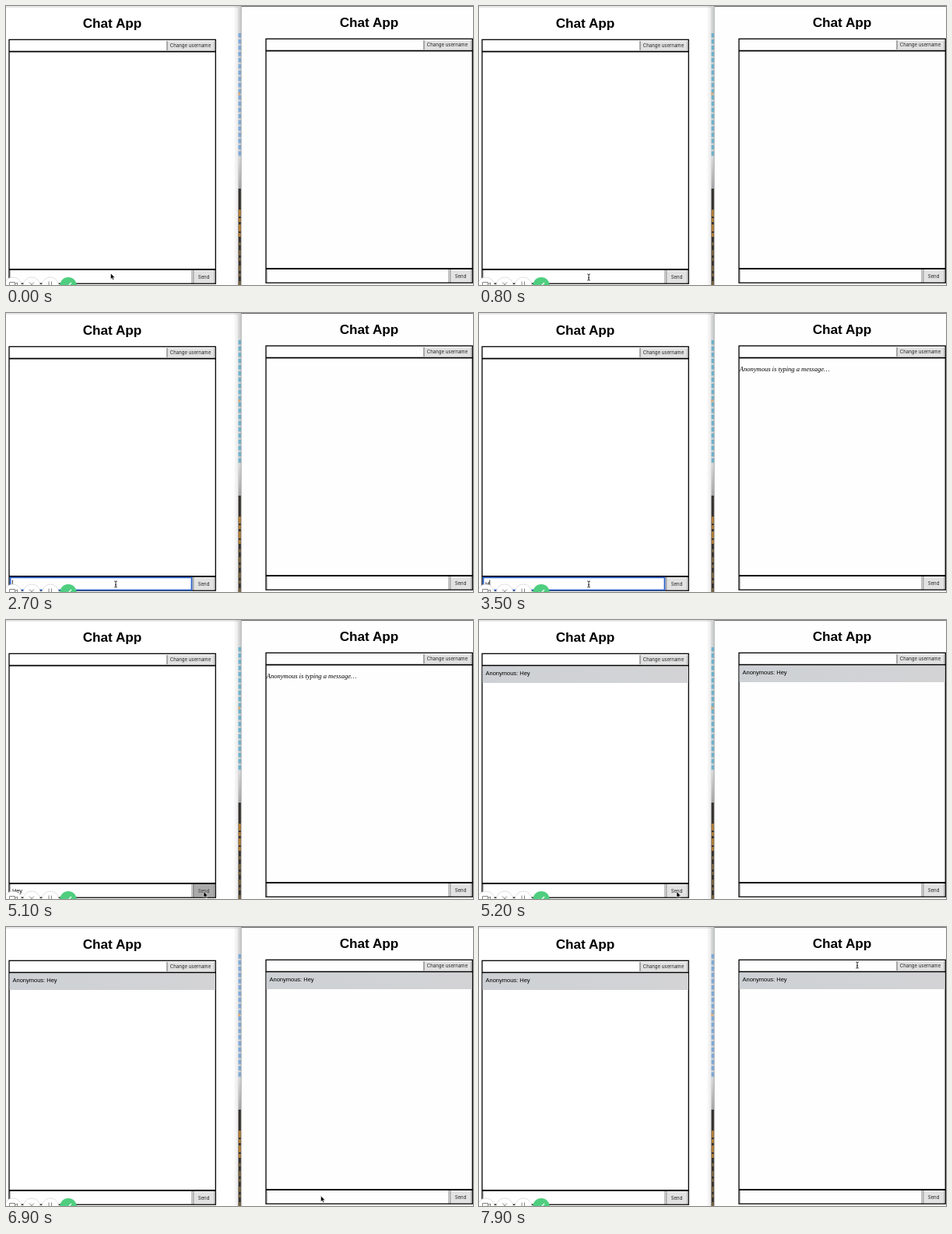
An HTML page that plays this animation: 600 by 359 pixels, repeating every 8000 ms.

```html
<!DOCTYPE html>
<html lang="en">
<head>
<meta charset="utf-8">
<title>Chat App</title>
<style>
html, body { margin: 0; width: 100%; height: 100%; overflow: hidden; background: #fff; }
svg { display: block; width: 100vw; height: 100vh; }
text { font-family: "Liberation Sans", Arial, sans-serif; font-size: 7.5px; fill: #000; }
.title { font-size: 17.2px; font-weight: bold; text-anchor: middle; }
.label { font: 6.05px Inter, sans-serif; fill: #222; text-anchor: middle; }
.typing { font: italic 8.5px "Liberation Serif", Times, serif; }
</style>
</head>
<body>
<svg viewBox="0 0 600 359" preserveAspectRatio="none">
  <defs>
    <linearGradient id="shade">
      <stop offset="0" stop-color="#000" stop-opacity="0"/>
      <stop offset="1" stop-color="#000" stop-opacity=".1"/>
    </linearGradient>
    <linearGradient id="fade" x2="0" y2="1">
      <stop offset="0" stop-color="#d8d9da"/>
      <stop offset="1" stop-color="#a6a6a8"/>
    </linearGradient>
    <linearGradient id="row">
      <stop offset="0" stop-color="#cdd1d5"/>
      <stop offset="1" stop-color="#d3d3d5"/>
    </linearGradient>
    <g id="panel">
      <text class="title" x="136.5" y="28.3">Chat App</text>
      <path d="M206 45h62v12h-62zM240 340.500h28v16h-28z" fill="#e2e2e2"/>
      <path d="M207 45v12M240.500 340v17" stroke="#a8a8a8" stroke-width="2"/>
      <path d="M267.500 45v12M267.500 340v17" stroke="#bbb"/>
      <path d="M5.500 340v16.500M238.500 340v17" stroke="#bbb"/>
      <rect x="4" y="43.300" width="265.300" height="313.900" fill="none" stroke="#000" stroke-width="1.3"/>
      <path d="M4 58.700h265.300M4 339h265.300" stroke="#000" stroke-width="1.8"/>
      <text class="label" x="237" y="53.200">Change username</text>
      <text class="label" x="254" y="350.500">Send</text>
    </g>
    <g id="message">
      <rect x="4.600" y="59.600" width="264" height="21.400" fill="url(#row)"/>
      <text x="8.500" y="70.700">Anonymous: Hey</text>
    </g>
  </defs>

  <rect width="600" height="359" fill="#fff"/>
  <path d="M0 1h299" stroke="#ccc"/>
  <rect x="292" width="7" height="359" fill="url(#shade)"/>

  <!-- desktop showing between the windows -->
  <rect x="298.500" width="4" height="194" fill="#d0d2d4"/>
  <path id="dashes" d="M300.300 35v158" stroke-width="3.4" stroke-dasharray="5.5 2.5"/>
  <rect x="298.500" y="111" width="2" height="4" fill="#d9a56c"/>
  <rect x="298.500" y="194" width="4" height="41" fill="url(#fade)"/>
  <rect x="298.500" y="235" width="4" height="124" fill="#35312d"/>
  <path d="M300.300 262v38" stroke="#b07c32" stroke-width="3" stroke-dasharray="9 2 5 3"/>
  <path d="M300.300 304v55" stroke="#75613f" stroke-width="3" stroke-dasharray="4 6 7 3"/>

  <rect x="302" width="298" height="359" fill="#fefefe"/>
  <path d="M302 .300h298" stroke="#444"/>
  <path d="M302.200 0v359" stroke="#999" stroke-width=".8"/>

  <use href="#panel"/>
  <use href="#panel" x="330" y="-1"/>
  <g id="sent">
    <use href="#message"/>
    <use href="#message" x="330" y="-1"/>
  </g>
  <text id="typing" class="typing" x="334.800" y="75">Anonymous is typing a message…</text>
  <rect id="pressed" x="240" y="340" width="28.500" height="17" fill="#555" opacity=".4"/>
  <rect id="ring" x="5.500" y="340.300" width="233" height="16.200" fill="none" stroke="#2c62c8" stroke-width="1.8"/>
  <text id="draft" x="8" y="350.700" style="font-size:7.3px"></text>
  <path id="caret" stroke="#000" stroke-width=".8" d="M0 343.500v9"/>

  <!-- recorder buttons -->
  <g fill="#fff" stroke="#d2d2d2" stroke-width=".7">
    <circle cx="9" cy="360" r="11"/>
    <circle cx="33" cy="360" r="11"/>
    <circle cx="57" cy="360" r="11"/>
  </g>
  <circle cx="80" cy="360" r="11" fill="#4fce7f"/>
  <g fill="none" stroke="#777" stroke-width=".9">
    <path d="M4.500 360v-4.500h7v4.500M11.500 358l3-2v4M30 355.500l6 6M36 355.500l-6 6M55 354.500v5M58.500 354.500v5"/>
    <path d="M77 359l2 2 5-5" stroke="#fff" stroke-width="1.3"/>
  </g>

  <path id="arrow" d="M0 0v7.500l1.700-1.600 1.300 2.700 1.300-.6-1.300-2.600h2.400z" fill="#000" stroke="#fff" stroke-width=".5"/>
  <path id="beam" d="M-1.800-4q1.800 0 1.800 1 0-1 1.800-1M0-3v6M-1.800 4q1.800 0 1.800-1 0 1 1.800 1M-1 .800h2" fill="none" stroke="#111" stroke-width=".9"/>
</svg>
<script>
const $ = id => document.getElementById(id);
const show = (id, on) => $(id).setAttribute('visibility', on ? 'visible' : 'hidden');

// pointer stops: time, x, y
const stops = [
  [0, 134.5, 344], [300, 141, 349], [4300, 141, 349], [4900, 254, 349.5],
  [5500, 254, 349.5], [5800, 421, 285], [5900, 421, 285], [6500, 404.5, 346],
  [7200, 404.5, 346], [7700, 486, 49], [8000, 486, 49]
];

function pointer(t) {
  const i = stops.findIndex(s => s[0] > t);
  const [a, b] = [stops[i - 1], stops[i]];
  const p = (t - a[0]) / (b[0] - a[0]);
  const e = p * p * (3 - 2 * p);
  return [a[1] + (b[1] - a[1]) * e, a[2] + (b[2] - a[2]) * e];
}

function draw(now) {
  const t = Math.floor(now % 8000 / 100) * 100;
  const within = (from, to) => t >= from && t < to;
  const [x, y] = pointer(t);
  const beam = within(300, 4800) && x < 239 || t >= 7700;
  for (const id of ['arrow', 'beam']) $(id).setAttribute('transform', `translate(${x} ${y})`);
  show('arrow', !beam);
  show('beam', beam);

  const typed = t >= 5200 ? 0 : [3400, 3600, 3800].filter(k => t >= k).length;
  $('draft').textContent = 'Hey'.slice(0, typed);
  $('caret').setAttribute('transform', `translate(${[8.3, 13.8, 17.8, 21.5][typed]} 0)`);
  show('caret', within(2600, 2900) || within(3400, 4300) || within(4800, 5100));
  show('ring', within(2600, 5100));
  show('typing', within(3400, 5200));
  show('pressed', within(5100, 5200));
  show('sent', t >= 5200);
  $('dashes').setAttribute('stroke', within(500, 6700) ? '#6cb2cc' : '#7da9d8');
}

const start = performance.now();
function loop() {
  draw(performance.now() - start);
  requestAnimationFrame(loop);
}
loop();
</script>
</body>
</html>
```
